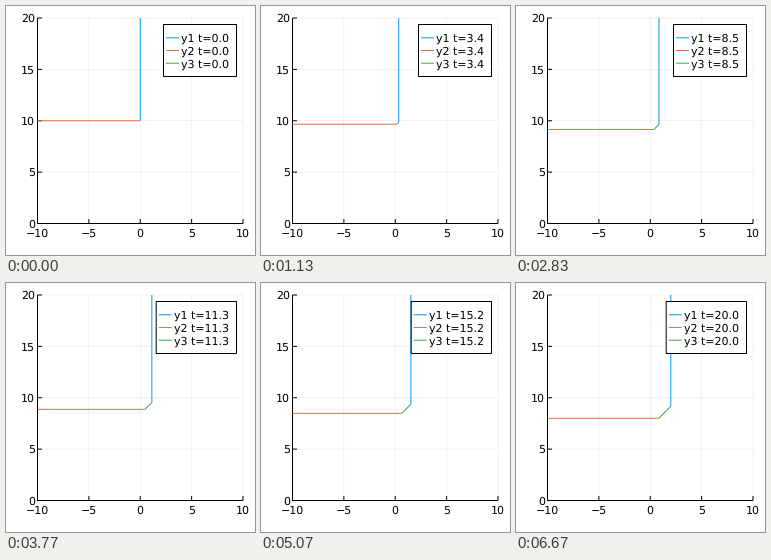
Animation, 249 px wide and 249 px high, one loop 6710 ms. Source, as a matplotlib script:

```python
import math

import matplotlib.pyplot as plt
from matplotlib.animation import FuncAnimation
from matplotlib.patches import Rectangle

SIZE, DPI = 249, 100
LOOP_MS, TICK_MS = 6710, 10
FPS, LAST_STEP = 30, 200
PT = 72 / DPI                      # one pixel in points
FONT = 11.5                        # pixels
DIGIT = 0.636 * FONT               # advance of one digit
LEFT, RIGHT, TOP, BOTTOM = 31.5, 237.0, 12.0, 217.5
TICK_LEN = 4.5
COLORS = ["#009afa", "#e36f47", "#3ea44e"]
GRID = "#e6e6e6"
SPEED = 0.1

plt.rcParams.update({
    "font.family": "DejaVu Sans",
    "font.size": FONT * PT,
    "text.hinting": "none",
    "text.hinting_factor": 1,
    "lines.solid_capstyle": "butt",
})

fig = plt.figure(figsize=(SIZE / DPI, SIZE / DPI), dpi=DPI, facecolor="white")
ax = fig.add_axes([0, 0, 1, 1])
ax.set_xlim(0, SIZE)
ax.set_ylim(SIZE, 0)
ax.axis("off")


def px(x):
    return LEFT + (x + 10) / 20 * (RIGHT - LEFT)


def py(y):
    return BOTTOM - y / 20 * (BOTTOM - TOP)


def strokes(draw, at, start, end, color="black", width=1.0, z=2):
    """Parallel strokes, drawn with ax.vlines or ax.hlines."""
    draw(at, start, end, colors=color, linewidths=width * PT, zorder=z,
         snap=False)


def line(color, z):
    return ax.plot([], [], color=color, lw=PT, zorder=z, snap=False)[0]


def label(x, y, text, ha, z=3):
    """Place text with its digits centred vertically on y."""
    return ax.text(x, y + 0.365 * FONT, text, ha=ha, va="baseline", zorder=z)


def draw_axes():
    x_ticks, y_ticks = range(-10, 11, 5), range(0, 21, 5)
    xs, ys = [px(v) for v in x_ticks], [py(v) for v in y_ticks]
    strokes(ax.vlines, xs, TOP, BOTTOM, GRID, 0.5, 1)
    strokes(ax.hlines, ys, LEFT, RIGHT, GRID, 0.5, 1)
    strokes(ax.vlines, xs, BOTTOM - TICK_LEN, BOTTOM)
    strokes(ax.hlines, ys, LEFT, LEFT + TICK_LEN)
    strokes(ax.vlines, [LEFT], TOP, BOTTOM + 0.5)
    strokes(ax.hlines, [BOTTOM], LEFT - 0.5, RIGHT)
    for v, x in zip(x_ticks, xs):
        label(x, 226.3, str(v).replace("-", "\u2212"), "center")
    for v, y in zip(y_ticks, ys):
        label(28.8, y, str(v), "right")


draw_axes()
facets = [line(c, 4) for c in COLORS]

box = ax.add_patch(Rectangle((0, 18.5), 73, 52, facecolor="white",
                             edgecolor="black", lw=PT, zorder=5, snap=False))
rows = [44.5 + 12.7 * i for i in (-1, 0, 1)]
keys = [line(c, 6) for c in COLORS]
names = [label(0, y, "", "left", 6) for y in rows]


def update(n):
    step = min(int((n + 0.5) * TICK_MS * FPS / 1000), LAST_STEP)
    t = step / 10
    d = SPEED * t
    e = d * (math.sqrt(2) - 1)
    low, high = (e, 10 - d), (d, 10 - e)      # ends of the slanted facet
    ends = [((d, 20), high), ((-10, 10 - d), low), (low, high)]
    for facet, pts in zip(facets, ends):
        facet.set_data([px(x) for x, _ in pts], [py(y) for _, y in pts])

    shift = DIGIT if t >= 10 else 0
    box.set_x(157.5 - shift)
    box.set_width(73 + shift)
    for i, y in enumerate(rows):
        keys[i].set_data([160 - shift, 173 - shift], [y, y])
        names[i].set_x(175.3 - shift)
        names[i].set_text(f"y{i + 1} t={t:.1f}")
    return [*facets, box, *keys, *names]


anim = FuncAnimation(fig, update, frames=LOOP_MS // TICK_MS, interval=TICK_MS,
                     repeat=True, repeat_delay=0, blit=False)
plt.show()
```
